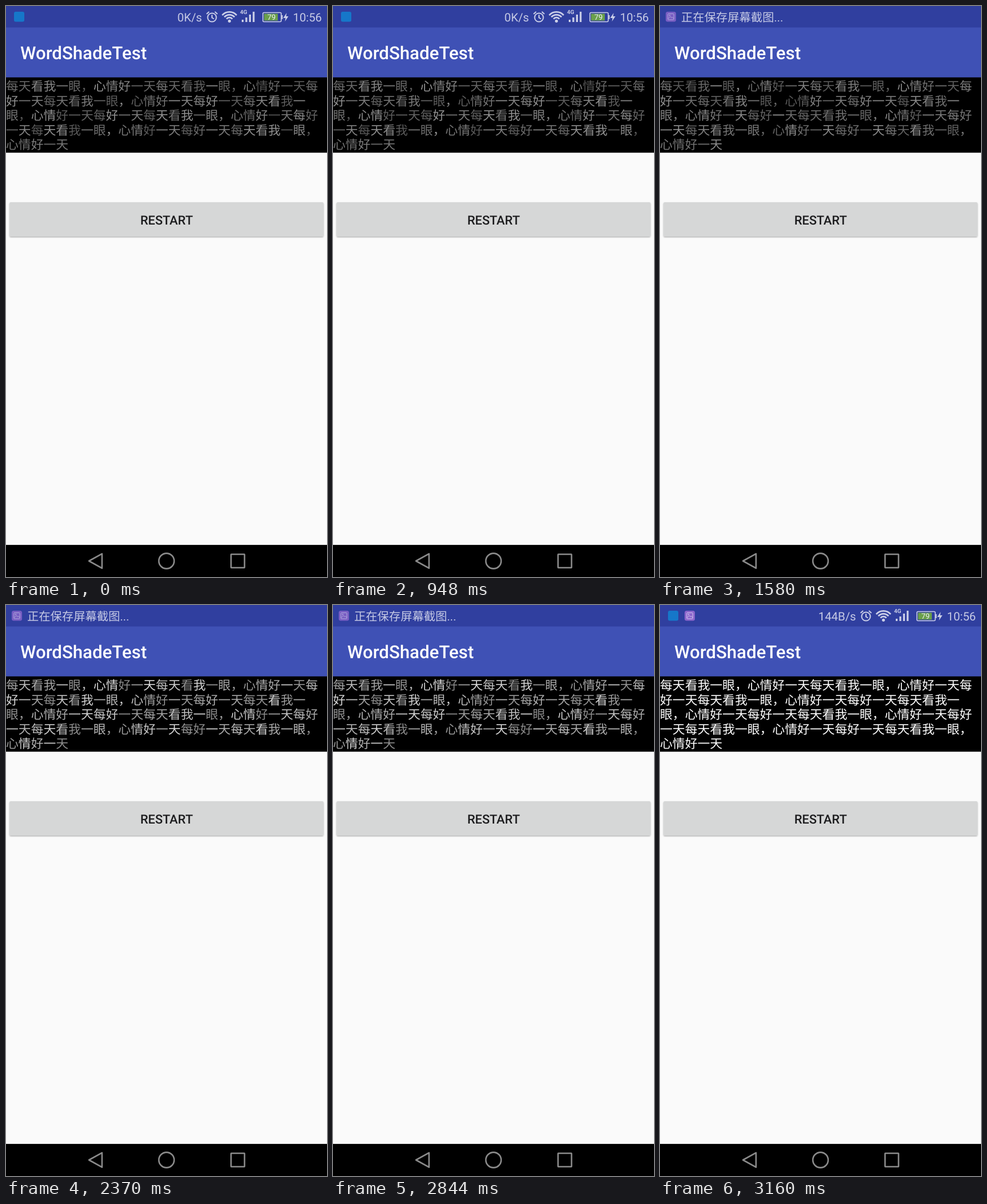
An HTML page for the animation above (3.95 s loop, 561 by 998 pixels).

```html
<!DOCTYPE html>
<html lang="zh-CN">
<head>
<meta charset="utf-8">
<title>Text fade</title>
<style>
  html, body { margin: 0; width: 100%; height: 100%; overflow: hidden; background: #fafafa; }
  svg { display: block; width: 100%; height: 100%; }
  text {
    font-family: Roboto, "Noto Sans CJK SC", "Noto Sans CJK", sans-serif;
    text-rendering: geometricPrecision;
    text-spacing-trim: space-all;
  }
  .status text { font-size: 20.3px; fill: #c6cae5; }
  .body text { font-family: "Noto Sans CJK SC", "Noto Sans CJK", sans-serif; font-size: 21.82px; }
  .line { fill: none; stroke: #cbcfe8; stroke-width: 2; }
  .thin { stroke-width: 1.6; }
  .thick { stroke-width: 2.8; }
  .solid { fill: #cbcfe8; }
  .nav { fill: none; stroke: #8a8a8a; stroke-width: 2.6; stroke-linejoin: round; }
</style>
</head>
<body>
<svg viewBox="0 0 561 998" preserveAspectRatio="none">
  <defs>
    <filter id="shadow" x="-2%" y="-10%" width="104%" height="125%">
      <feDropShadow dx="0" dy="1.1" stdDeviation="1.2" flood-opacity=".34"/>
    </filter>
    <g id="picture">
      <rect width="18" height="17.5" rx="3.5" fill="#8b66cc"/>
      <g fill="none" stroke="#d3c4ee" stroke-width="1">
        <rect x="3.8" y="3.6" width="10.4" height="10.4" rx="1"/>
        <path d="M4 12.5 8 8.5 10 10.5 11.5 9.5 14 12"/>
        <circle cx="7" cy="6.5" r=".8"/>
      </g>
    </g>
  </defs>

  <rect width="561" height="998" fill="#fafafa"/>
  <rect y="124" width="561" height="132.4" fill="#000"/>
  <rect y="37" width="561" height="87.75" fill="#3f51b5"/>
  <rect width="561" height="37.5" fill="#303f9f"/>
  <rect y="941.9" width="561" height="56.1" fill="#000"/>

  <g class="status" id="normal">
    <rect x="14" y="10" width="18" height="17.5" rx="3" fill="#1677c9"/>
    <use id="saved" href="#picture" x="43" y="10"/>
    <text id="speed" x="342.5" y="27" text-anchor="end"></text>

    <g class="line">
      <circle cx="360" cy="20" r="7.6"/>
      <path d="M360 15.5V20.5L363.5 22.5M350.5 14 355 10M369.5 14 365 10"/>
    </g>

    <g class="line thick" id="wifi"></g>
    <circle class="solid" cx="390.5" cy="26.3" r="2.6"/>

    <text x="409" y="14" style="font-size:10px;font-weight:700">4G</text>
    <path class="solid" d="M412 24h3.2v4h-3.2zM418.4 20h3.2v8h-3.2zM424.8 15h3.2v13h-3.2zM431.2 10h3.2v18h-3.2z"/>

    <rect class="line thin" x="449" y="11.5" width="32" height="16" rx="2"/>
    <rect x="451" y="13.5" width="24" height="12" fill="#6a9f4b"/>
    <rect class="solid" x="481.5" y="16" width="2" height="7"/>
    <text x="464" y="24.3" text-anchor="middle" style="font-size:13px;fill:#eef0f8">79</text>
    <path class="solid" d="M490.5 12 484.5 21H488.5L487.5 27 493.5 18H489.5Z"/>
    <text x="552" y="27" text-anchor="end">10:56</text>
  </g>

  <g class="status" id="notice">
    <use href="#picture" x="10" y="10" opacity=".8"/>
    <text x="37" y="27">正在保存屏幕截图...</text>
  </g>

  <text x="25" y="93" font-size="31.17" font-weight="500" fill="#fff">WordShadeTest</text>
  <g class="body" id="body"></g>

  <rect x="6.2" y="343" width="548.6" height="60" rx="2" fill="#d6d7d7" filter="url(#shadow)"/>
  <text x="280.7" y="381.7" text-anchor="middle" font-size="21.82" font-weight="500" fill="#1c1c1e">RESTART</text>

  <g class="nav">
    <path d="M145 970 167.8 957.3V982.7Z"/>
    <circle cx="280.5" cy="970" r="13.4"/>
    <rect x="393.3" y="958.2" width="23.6" height="23.6" rx=".5"/>
  </g>
</svg>
<script>
const NS = "http://www.w3.org/2000/svg";
const byId = id => document.getElementById(id);
const LOOP = 3950;

// Each stage holds still; letters get a random grey between low and high.
const stages = [
  { start: 0, low: 82, high: 146, speed: "0K/s" },
  { start: 1580, low: 86, high: 146, notice: true },
  { start: 2370, low: 138, high: 218, notice: true },
  { start: 3160, low: 255, high: 255, speed: "144B/s", saved: true }
];

const lines = [
  "每天看我一眼，心情好一天每天看我一眼，心情好一天每",
  "好一天每天看我一眼，心情好一天每好一天每天看我一",
  "眼，心情好一天每好一天每天看我一眼，心情好一天每好",
  "一天每天看我一眼，心情好一天每好一天每天看我一眼，",
  "心情好一天"
];

function add(parent, tag, attrs, content = "") {
  const node = document.createElementNS(NS, tag);
  for (const key in attrs) node.setAttribute(key, attrs[key]);
  node.textContent = content;
  parent.appendChild(node);
  return node;
}

const letters = lines.flatMap((line, row) => {
  const text = add(byId("body"), "text", { x: 0, y: 148.1 + row * 25.47 });
  return [...line].map(char => add(text, "tspan", {}, char));
});

for (const r of [6.8, 11.7, 16.6]) {
  const dx = r * 0.76, y = 27 - r * 0.65;
  add(byId("wifi"), "path", { d: `M${390.5 - dx} ${y}A${r} ${r} 0 0 1 ${390.5 + dx} ${y}` });
}

function random(index, seed) {
  const n = Math.sin(index * 12.9898 + seed * 78.233 + 4.1) * 43758.5453;
  return n - Math.floor(n);
}

const show = (id, on) => { byId(id).style.display = on ? "" : "none"; };

let current = -1;

function render(time) {
  const t = time % LOOP;
  const index = stages.findLastIndex(stage => t >= stage.start);
  if (index === current) return;
  current = index;
  const { low, high, speed, notice, saved } = stages[index];
  show("normal", !notice);
  show("notice", notice);
  show("saved", saved);
  byId("speed").textContent = speed || "";
  letters.forEach((letter, i) => {
    const grey = Math.round(low + (high - low) * random(i, index));
    letter.setAttribute("fill", `rgb(${grey},${grey},${grey})`);
  });
}

const origin = performance.now();
function tick() {
  render(performance.now() - origin);
  requestAnimationFrame(tick);
}
tick();
</script>
</body>
</html>
```
